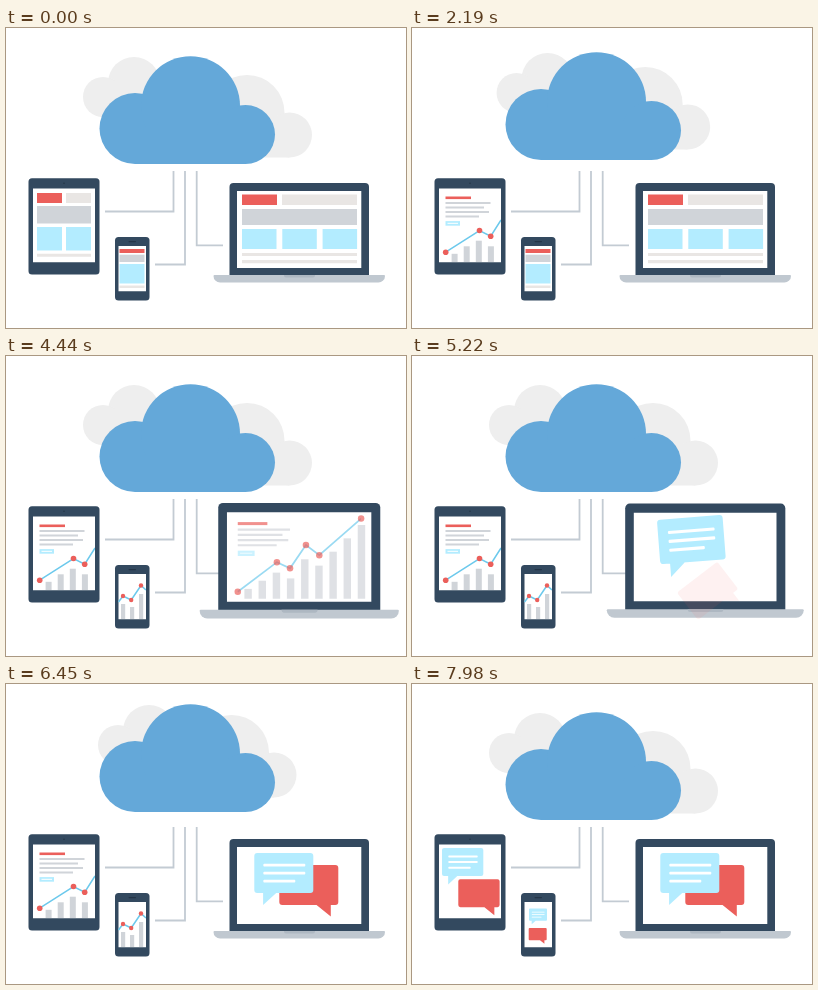
An HTML page with a canvas that plays this animation: 400 px wide and 300 px high, repeating every 8 s.

```html
<!DOCTYPE html>
<html lang="en">
<head>
<meta charset="utf-8">
<title>Devices syncing through a cloud</title>
<style>
html, body { margin: 0; width: 100%; height: 100%; overflow: hidden; background: #fff; }
canvas { display: block; width: 400px; height: 300px; }
</style>
</head>
<body>
<canvas id="stage"></canvas>
<script>
const LOOP = 8000;
const BLUE = '#64a8d9', PALE = '#eeeeee', DARK = '#33495f', RED = '#eb5f5b';
const SKY = '#b3ecff', GREY = '#d0d4d9', LIGHT = '#e9e6e4', WIRE = '#c3cbd3', CURVE = '#6cc9ec';

const canvas = document.getElementById('stage');
const ctx = canvas.getContext('2d');
const ratio = window.devicePixelRatio || 1;
canvas.width = 400 * ratio;
canvas.height = 300 * ratio;

const clamp = x => Math.min(1, Math.max(0, x));
const span = (t, start, end) => clamp((t - start) / (end - start));
const easeOut = p => 1 - (1 - p) ** 3;
const smooth = p => p * p * (3 - 2 * p);
const backIn = p => p * p * (2.7 * p - 1.7);
const backOut = p => 1 - backIn(1 - p);
const bounce = (t, start) => Math.sin(Math.PI * span(t, start, start + 560)) ** 2;

function layer(draw) {
  ctx.save();
  draw();
  ctx.restore();
}

function faded(alpha, draw) {
  if (alpha <= 0) return;
  layer(() => { ctx.globalAlpha *= alpha; draw(); });
}

function zoomed(x, y, scale, draw) {
  layer(() => {
    ctx.translate(x, y);
    ctx.scale(scale, scale);
    ctx.translate(-x, -y);
    draw();
  });
}

function box(x1, y1, x2, y2, color, radius = 0) {
  ctx.fillStyle = color;
  ctx.beginPath();
  ctx.roundRect(x1, y1, x2 - x1, y2 - y1, radius);
  ctx.fill();
}

function disc(x, y, r, color) {
  ctx.fillStyle = color;
  ctx.beginPath();
  ctx.arc(x, y, r, 0, 7);
  ctx.fill();
}

function polyline(points, color, width) {
  ctx.strokeStyle = color;
  ctx.lineWidth = width;
  ctx.beginPath();
  points.forEach(([x, y]) => ctx.lineTo(x, y));
  ctx.stroke();
}

// Wires run from device to cloud.
const wires = {
  tablet: [[99, 183.5], [167.5, 183.5], [167.5, 143]],
  phone: [[149, 236.5], [179, 236.5], [179, 143]],
  laptop: [[217, 217.3], [190.7, 217.3], [190.7, 143]]
};

function packet(wire, p) {
  if (p <= 0 || p >= 1) return;
  const [a, b, c] = wire;
  const first = Math.abs(a[0] - b[0]), second = b[1] - c[1];
  const d = p * (first + second);
  if (d < first) disc(a[0] + (b[0] - a[0]) * d / first, a[1], 3, BLUE);
  else disc(b[0], b[1] - (d - first), 3, BLUE);
}

function clouds(lift) {
  layer(() => {
    ctx.translate(15 * lift, -8 * lift);
    disc(128, 55, 26, PALE);
    disc(97, 69, 20, PALE);
    box(97, 60, 140, 89, PALE);
  });
  layer(() => {
    ctx.translate(-15.5 * lift, -16 * lift);
    disc(241, 84.5, 37.5, PALE);
    disc(283.5, 107, 22.5, PALE);
    box(235, 95, 283.5, 129.5, PALE);
  });
  layer(() => {
    ctx.translate(0, -8 * lift);
    disc(129, 100.5, 35.5, BLUE);
    disc(184.5, 77.8, 49.5, BLUE);
    disc(239.5, 106.5, 29.5, BLUE);
    box(129, 100, 239.5, 136, BLUE);
  });
}

function wireframe(items, gone) {
  faded(1 - gone, () => items.forEach(([x1, y1, x2, y2, color]) =>
    zoomed((x1 + x2) / 2, (y1 + y2) / 2, 1 - 0.3 * gone, () => box(x1, y1, x2, y2, color))));
}

function article(x, y, p) {
  const grow = i => easeOut(span(p, i * 0.08, i * 0.08 + 0.4));
  box(x, y, x + 25.5 * grow(0), y + 2.6, RED);
  [45, 38.5, 43.5, 33.5].forEach((width, i) => {
    const top = y + 5.6 + i * 4.5;
    box(x, top, x + width * grow(i + 1), top + 1.8, GREY);
  });
  faded(grow(5), () => {
    box(x, y + 24.6, x + 14.5, y + 29.2, SKY);
    box(x + 2, y + 26.3, x + 12.5, y + 27.5, '#f2fcff');
  });
}

function chart(c, p) {
  if (p <= 0) return;
  c.bars.forEach((top, i) => {
    const start = 0.4 * i / c.bars.length;
    const height = (c.floor - top) * easeOut(span(p, start, start + 0.45));
    const x = c.barX + i * c.step;
    box(x, c.floor - height, x + c.barWidth, c.floor, GREY);
  });
  const left = c.line[0][0], right = c.line[c.line.length - 1][0];
  const reach = left + (right - left) * smooth(span(p, 0.25, 0.9));
  layer(() => {
    ctx.beginPath();
    ctx.rect(left - 1, 150, reach - left + 1, 100);
    ctx.clip();
    polyline(c.line, CURVE, 1.5);
  });
  c.dots.forEach(i => {
    const [x, y] = c.line[i];
    const at = 0.25 + 0.55 * (x - left) / (right - left);
    const r = c.dotSize * backOut(span(p, at, at + 0.2));
    if (r > 0) disc(x, y, r, RED);
  });
  if (c.text) article(...c.text, p);
}

// A bubble in its own 59 x 40 units; it swings in while fading up.
function bubble(x, y, size, p, color, reply) {
  if (p <= 0) return;
  const q = (1 - p) ** 2;
  const [dx, dy] = reply ? [-9, 36] : [34, -27];
  layer(() => {
    ctx.globalAlpha *= Math.min(1, p * (p > 0.4 ? 1.6 : 1));
    ctx.translate(x + (29.5 + dx * q) * size, y + (20 + dy * q) * size);
    ctx.rotate(-q * Math.PI / 4);
    ctx.scale(size * (1 - 0.3 * q), size * (1 - 0.3 * q));
    ctx.translate(-29.5, -20);
    ctx.fillStyle = color;
    ctx.beginPath();
    ctx.roundRect(0, 0, 59, 40, 3);
    const tail = reply ? [[36, 39], [51.5, 39], [51.5, 51.5]] : [[8.8, 39], [23, 39], [8.8, 52]];
    tail.forEach(([px, py], i) => i ? ctx.lineTo(px, py) : ctx.moveTo(px, py));
    ctx.closePath();
    ctx.fill();
    if (!reply) [42, 42, 32].forEach((width, i) =>
      box(9, 10.7 + i * 8, 9 + width, 13.5 + i * 8, '#fff', 1));
  });
}

const tabletFrame = [
  [31, 165, 56, 175, RED], [60, 165, 85, 175, LIGHT], [31, 178, 85, 195.5, GREY],
  [31, 199, 56, 222.5, SKY], [60, 199, 85, 222.5, SKY], [31, 225.7, 85, 228.7, LIGHT]
];
const phoneFrame = [
  [113.5, 221, 138.5, 225, RED], [113.5, 226.7, 138.5, 234, GREY],
  [113.5, 236, 138.5, 255.5, SKY], [113.5, 257.5, 138.5, 260, LIGHT]
];
const laptopFrame = [
  [236, 166.5, 271, 177, RED], [276, 166.5, 351, 177, LIGHT], [236, 181, 351, 197, GREY],
  ...[236, 276.3, 316.6].map(x => [x, 201, x + 34.5, 221, SKY]),
  [236, 225, 351, 228, LIGHT], [236, 232, 351, 235.3, LIGHT]
];

const tabletChart = {
  bars: [225.8, 218.3, 212.7, 218.3], barX: 39.6, step: 12.1, barWidth: 6, floor: 234,
  line: [[33.7, 224.2], [67.5, 202.5], [78.7, 208.2], [89, 192]], dots: [0, 1, 2],
  dotSize: 2.8, text: [33.5, 168.5]
};
const phoneChart = {
  bars: [248, 251, 238], barX: 115, step: 9, barWidth: 4.2, floor: 263,
  line: [[112.5, 246], [117, 240], [125.2, 244], [135, 229.5], [140, 234]], dots: [1, 2, 3],
  dotSize: 2.2
};
const laptopChart = {
  bars: [229, 222, 215, 220, 203.5, 209, 197, 185.5, 174], barX: 246, step: 12.2, barWidth: 6.4,
  floor: 237.5,
  line: [[240.3, 231.5], [274, 206], [285.3, 211.3], [299, 191.3], [310.5, 200], [346.5, 168.5]],
  dots: [0, 1, 2, 3, 4, 5], dotSize: 2.8, text: [240.3, 171.5]
};

function tablet(t) {
  const scale = 1 + 0.178 * (easeOut(span(t, 360, 900)) - backIn(span(t, 1560, 1940)));
  zoomed(58, 198.2, scale, () => {
    box(22.5, 150.2, 93.5, 246.5, DARK, 3.5);
    disc(58, 155.3, 0.8, '#243547');
    box(27, 160.5, 89, 234.2, '#fff');
    wireframe(tabletFrame, span(t, 400, 720));
    faded(1 - span(t, 6750, 7050), () => chart(tabletChart, span(t, 680, 1330)));
    bubble(30, 164, 0.7, span(t, 7030, 7500), SKY, false);
    bubble(46.3, 195.2, 0.7, span(t, 7310, 7780), RED, true);
  });
}

function phone(t) {
  box(109, 209, 143.5, 272.5, DARK, 3.5);
  box(122.5, 213, 130, 214.2, '#243547', 0.6);
  box(112.5, 218, 140, 263.2, '#fff');
  wireframe(phoneFrame, span(t, 2790, 3010));
  faded(1 - span(t, 6750, 7050), () => chart(phoneChart, span(t, 2960, 3550)));
  bubble(117, 224.5, 0.305, span(t, 7030, 7500), SKY, false);
  bubble(116.7, 244, 0.305, span(t, 7310, 7780), RED, true);
}

function laptop(t) {
  const scale = 1 + 0.148 * (backOut(span(t, 4170, 4700)) - backIn(span(t, 5640, 6040)));
  zoomed(293.2, 205, scale, () => {
    box(223.5, 155, 363, 248, DARK, [4, 4, 0, 0]);
    box(231, 163, 355.3, 240, '#fff');
    box(207.5, 247, 379, 254.5, '#c0c8d0', [1, 1, 7, 7]);
    box(278, 247, 309, 249.5, '#aeb8c2', [0, 0, 2, 2]);
    wireframe(laptopFrame, span(t, 2790, 3010));
    faded(1 - span(t, 4300, 4750), () => chart(laptopChart, span(t, 2900, 3550)));
    bubble(273.3, 181, 1, span(t, 5180, 5650), RED, true);
    bubble(248.3, 169, 1, span(t, 4900, 5368), SKY, false);
  });
}

function render(now) {
  const t = now % LOOP;
  ctx.setTransform(ratio, 0, 0, ratio, 0, 0);
  ctx.fillStyle = '#fff';
  ctx.fillRect(0, 0, 400, 300);
  Object.values(wires).forEach(wire => polyline(wire, WIRE, 1.8));
  packet(wires.tablet, smooth(span(t, 1640, 1960)));
  packet(wires.phone, 1 - smooth(span(t, 2440, 2800)));
  packet(wires.laptop, 1 - smooth(span(t, 2440, 2800)));
  packet(wires.laptop, smooth(span(t, 5840, 6150)));
  packet(wires.phone, 1 - smooth(span(t, 6540, 6900)));
  packet(wires.tablet, 1 - smooth(span(t, 6540, 6900)));
  clouds(bounce(t, 2050) + bounce(t, 6170));
  tablet(t);
  phone(t);
  laptop(t);
}

const startTime = performance.now();
function tick() {
  render(performance.now() - startTime);
  requestAnimationFrame(tick);
}
tick();
</script>
</body>
</html>
```
